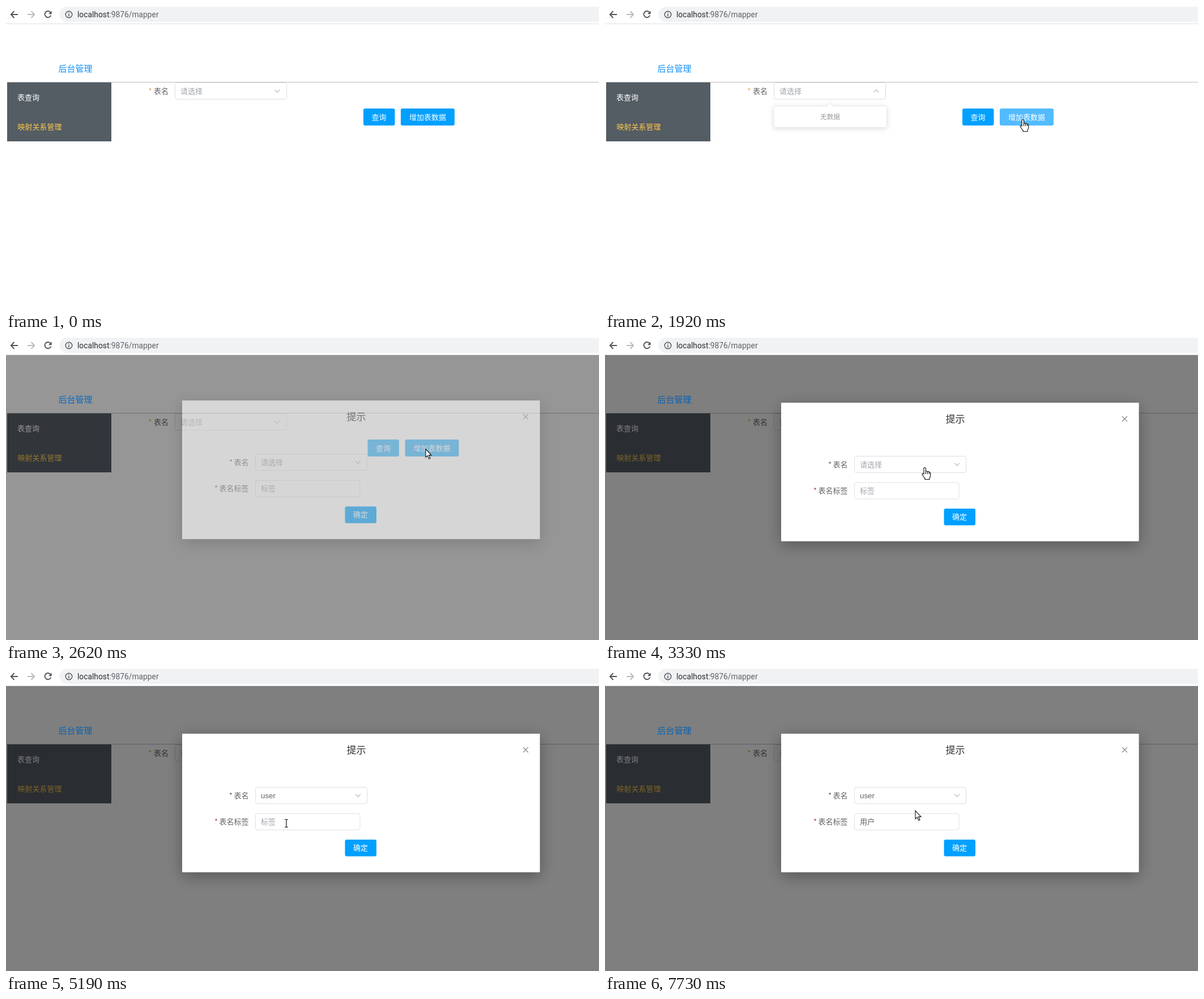
An HTML page for the animation above (7.99 s loop, 1047 by 535 pixels).

```html
<!DOCTYPE html>
<html lang="zh-CN">
<head>
<meta charset="utf-8">
<title>后台管理</title>
<style>
html, body { margin: 0; width: 100%; height: 100%; overflow: hidden; background: #fff; }
svg { display: block; width: 1047px; height: 535px; }
text { font: 13px "Noto Sans CJK SC", "Noto Sans CJK", sans-serif; fill: #606266; white-space: pre; }
.mid { text-anchor: middle; }
.hint { fill: #a0a4ab; }
.btn { fill: #00a0ff; }
.onBtn { fill: #fff; text-anchor: middle; }
.box { fill: #fff; stroke: #dcdfe6; }
.chev { fill: none; stroke: #b4b8c0; stroke-width: 1.2; }
.latin { font-family: "Open Sans", "Noto Sans", sans-serif; font-size: 13.2px; }
.arial { font-family: "Liberation Sans", Arial, sans-serif; }
.icon { fill: none; stroke: #50545a; stroke-width: 1.9; }
</style>
</head>
<body>
<svg viewBox="0 0 1047 535">
  <defs>
    <filter id="soft" x="-20%" y="-40%" width="140%" height="190%">
      <feDropShadow dx="0" dy="2" stdDeviation="5" flood-opacity=".13"/>
    </filter>
    <filter id="deep" x="-15%" y="-30%" width="130%" height="170%">
      <feDropShadow dx="0" dy="7" stdDeviation="14" flood-opacity=".32"/>
    </filter>
    <path id="chevron" d="M-4.5 -2.3L0 2.3L4.5 -2.3"/>
  </defs>
  <rect width="1047" height="535" fill="#fff"/>

  <!-- browser bar -->
  <path class="icon" d="M21 15H9M14.5 9L8.8 15L14.5 21"/>
  <path class="icon" d="M38 15H50M44.5 9L50.2 15L44.5 21" style="stroke:#b9bbbe"/>
  <path class="icon" d="M78.6 11.2A5.6 5.6 0 1 0 79.4 16.5"/>
  <path d="M80.6 8.6V14.2H75Z" fill="#50545a"/>
  <path d="M1047 1.5H107.5a13.2 13.2 0 0 0 0 26.5H1047Z" fill="#f0f2f4"/>
  <circle cx="111" cy="15" r="5.8" class="icon" style="stroke-width:1.4"/>
  <path d="M111 14V18.2M111 11.3V12.8" class="icon" style="stroke-width:1.5"/>
  <text x="126" y="19.5" style="font:13.8px Roboto,sans-serif;fill:#5f6368"><tspan fill="#2b2d31">localhost</tspan>:9876/mapper</text>
  <path d="M0 31.5H1047" stroke="#dcdee0"/>

  <!-- page -->
  <path d="M2 134.5H1047" stroke="#bcbcbc"/>
  <rect x="2" y="135" width="184" height="104" fill="#545c64"/>
  <text x="20" y="165.7" style="fill:#fff">表查询</text>
  <text x="20.5" y="217.7" style="fill:#ffc94d">映射关系管理</text>
  <text x="251.5" y="155" style="fill:#e6a23c">*</text>
  <text x="261" y="154.8">表名</text>
  <rect id="sel1" class="box" x="298.5" y="135.5" width="197" height="29" rx="3.5"/>
  <text x="308" y="154.8" class="hint">请选择</text>
  <use id="chev1" href="#chevron" class="chev"/>
  <g id="pageBtns">
    <rect id="query" class="btn" x="631" y="181" width="55.5" height="30" rx="3"/>
    <text x="658.5" y="200.9" class="onBtn">查询</text>
    <rect id="add" class="btn" x="697" y="181" width="95" height="30" rx="3"/>
    <text x="744.5" y="200.9" class="onBtn">增加表数据</text>
  </g>
  <g id="drop1">
    <path filter="url(#soft)" d="M302 176.5H391L397 171.5L403 176.5H493.500a4 4 0 0 1 4 4V210.500a4 4 0 0 1 -4 4H302a4 4 0 0 1 -4 -4V180.500a4 4 0 0 1 4 -4Z" fill="#fff" stroke="#e4e7ed"/>
    <text x="397.5" y="200" class="mid" style="font-size:11.7px;fill:#999">无数据</text>
  </g>

  <path id="shade" fill-rule="evenodd"/>
  <text id="title" x="92.500" y="115.700" style="font-size:15px;font-weight:500">后台管理</text>

  <!-- dialog -->
  <rect id="back" x="311" width="631.500" height="244.500" rx="2"/>
  <g id="dialog">
    <rect x="311" y="116" width="631.500" height="244.500" rx="2" fill="#fff" filter="url(#deep)"/>
    <text x="618.500" y="151.300" class="mid" style="font-size:17px;fill:#303133">提示</text>
    <path d="M913 140L922 149M922 140L913 149" stroke="#85888e" stroke-width="1.200"/>
    <text x="394" y="230">*</text>
    <text x="402.500" y="229.800">表名</text>
    <text x="368" y="276" style="fill:#9c4a58">*</text>
    <text x="376.500" y="275.800">表名标签</text>
    <rect id="sel2" class="box" x="440.500" y="210.500" width="197" height="29" rx="3.500"/>
    <text id="pick" x="450" y="229.800" class="hint">请选择</text>
    <text id="picked" x="450" y="229.500" class="arial" style="font-size:13.300px">user</text>
    <use id="chev2" href="#chevron" class="chev"/>
    <rect id="input" class="box" x="440.500" y="257" width="184.500" height="29" rx="3.500"/>
    <text id="label" x="450" y="275.800"></text>
    <text id="typing" x="450" y="275.500" class="arial" text-decoration="underline"></text>
    <path id="caret" stroke="#333"/>
    <rect id="ok" class="btn" x="598.500" y="303" width="55.500" height="29.500" rx="3"/>
    <text x="626" y="322.300" class="onBtn" style="font-weight:500">确定</text>
  </g>
  <g id="drop2">
    <path filter="url(#soft)" d="M444.500 251.500H533.500L539.500 246.500L545.500 251.500H635.500a4 4 0 0 1 4 4V385.500a4 4 0 0 1 -4 4H444.500a4 4 0 0 1 -4 -4V255.500a4 4 0 0 1 4 -4Z" fill="#fff" stroke="#e4e7ed"/>
    <rect id="hover" x="441" width="198" height="31.500" fill="#f2f6fa"/>
    <g id="options"></g>
  </g>
  <g id="ime">
    <rect id="imeBar" x="450.500" y="287.500" height="33" fill="#fbfbfb" stroke="#d2d2d2"/>
    <g id="words"></g>
  </g>

  <!-- pointer -->
  <g id="pointer">
    <circle id="click" r="11" fill="#f8f04c" opacity=".85"/>
    <path id="arrow" d="M0 0V14.500L3.300 11.400L5.800 17L8 16L5.600 10.600H10Z" fill="#fff" stroke="#111" stroke-width="1.100"/>
    <path id="hand" d="M-2 12V2Q-2 .5 -.3 .5T1.500 2V8Q1.500 6.800 3 6.800T4.600 8.300Q4.800 7.500 6.200 7.600T7.600 9.200Q8 8.800 9 9T9.800 11V14Q9.800 17 8 19V21.500H0V19.500Q-2 17.500 -4.500 13.500Q-5.500 11.500 -4.200 11Q-3 10.800 -2 12ZM1.500 8V12M4.600 8.300V12M7.600 9.200V12" fill="#fff" stroke="#111" stroke-width="1.150"/>
    <path id="beam" d="M-3 -6.500H-.8L0 -5.800L.8 -6.500H3M-3 7H-.8L0 6.300L.8 7H3M0 -5.800V6.300" fill="none" stroke="#111" stroke-width="1.200"/>
  </g>
</svg>
<script>
const LOOP = 7990;
const BLUE = '#00a0ff', LIGHT = '#53bbff', GREY = '#dcdfe6', HOVER = '#8fc8ee';
const OPEN = 2480;          // dialog starts to appear
const ui = {};
document.querySelectorAll('[id]').forEach(e => ui[e.id] = e);

const set = (el, attrs) => { for (const k in attrs) el.setAttribute(k, attrs[k]); };
const show = (el, on) => set(el, { visibility: on ? 'visible' : 'hidden' });
const ramp = (t, start, span) => Math.min(1, Math.max(0, (t - start) / span));
const out = (u, k) => 1 - (1 - u) ** k;
const smooth = u => u * u * (3 - 2 * u);
const within = (t, a, b) => t >= a && t < b;
const mix = (a, b, u) => `rgb(${a.map((v, i) => Math.round(v + (b[i] - v) * u))})`;

function addText(parent, x, y, str, cls) {
  const el = document.createElementNS('http://www.w3.org/2000/svg', 'text');
  set(el, { x, y, class: cls });
  el.textContent = str;
  parent.append(el);
  return el;
}
['column_info', 'product', 'table_info', 'user'].forEach((name, i) =>
  addText(ui.options, 460, 277.5 + 31.5 * i, name, 'latin'));
const words = [...Array(7)].map(() => addText(ui.words, 0, 309, '', ''));

// time, x, y
const path = [
  [70, 982, 522], [420, 660, 290], [740, 428, 155], [1250, 426, 156], [1640, 660, 199],
  [1710, 668, 199], [1920, 738, 200], [2480, 738, 200], [2550, 741, 198], [2690, 741, 198],
  [3020, 594, 243], [3090, 590, 240], [3330, 565, 230], [3480, 548, 229], [3890, 546, 233],
  [4220, 513, 366], [4380, 513, 366], [4630, 497, 276], [4840, 495, 274], [6650, 495, 274],
  [6980, 630, 310], [7180, 630, 310], [7460, 548, 252], [LOOP, 548, 252]
];
const clicks = [[930, 1010], [2270, 2350], [3480, 3560], [4270, 4350], [4680, 4750]];

function pointerAt(t) {
  const i = Math.max(1, path.findIndex(k => k[0] > t));
  const [t0, x0, y0] = path[i - 1], [t1, x1, y1] = path[i];
  const u = ramp(t, t0, t1 - t0);
  return [x0 + (x1 - x0) * u, y0 + (y1 - y0) * u];
}

// open amount of a dropdown that opens at a and closes at b
const fold = (t, a, b) => t < b ? out(ramp(t, a, 300), 4) : 1 - out(ramp(t, b, 300), 4);

function drop(el, amount, cx, top) {
  show(el, amount > .01);
  set(el, { opacity: amount, transform: `translate(${cx} ${top}) scale(1 ${amount}) translate(${-cx} ${-top})` });
}
function chevron(el, x, y, t, a, b) {
  const turn = 180 * (smooth(ramp(t, a, 250)) - smooth(ramp(t, b, 200)));
  set(el, { transform: `translate(${x} ${y}) rotate(${-turn})` });
}

const keys = [5450, 5660, 5720, 5860, 6000, 6060];
const COMMIT = 6120;

function drawInput(t) {
  const n = t < COMMIT ? keys.filter(k => t >= k).length : 0;
  const done = t >= COMMIT;
  ui.label.textContent = done ? '用户' : n ? '' : '标签';
  ui.label.setAttribute('class', done ? '' : 'hint');
  ui.typing.textContent = 'yonghu'.slice(0, n);
  const x = done ? 476.5 : n ? 450 + 6.5 + 7.2 * (n - 1) + .5 : 450.5;
  set(ui.caret, { d: `M${x} 264V279` });
  show(ui.caret, within(t, 4680, 5190) || within(t, 5450, 6650) || within(t, 7180, 7730));
  set(ui.input, { stroke: t >= 4700 ? BLUE : GREY });

  show(ui.ime, n > 0);
  if (!n) return;
  const width = n < 2 ? 501 : n < 5 ? 552 : 610;
  const list = n < 2 ? '一有要也以因用' : n < 5 ? '用永勇涌拥泳咏' : ['用户', '拥护', '用', '永', '勇', '涌', '拥'];
  set(ui.imeBar, { width });
  words.forEach((w, i) => {
    set(w, { x: 462 + i * width / 7, style: i ? '' : 'fill:#1a73c8' });
    w.textContent = `${i + 1} ${list[i]}`;
  });
}

function drawPointer(t, x, y, kind) {
  show(ui.pointer, t >= 70);
  set(ui.pointer, { transform: `translate(${x} ${y})` });
  for (const k of ['arrow', 'hand', 'beam']) set(ui[k], { display: k === kind ? 'inline' : 'none' });
  set(ui.click, { display: clicks.some(([a, b]) => within(t, a, b)) ? 'inline' : 'none' });
}

function draw(t) {
  const [x, y] = pointerAt(t);
  const over = (l, top, r, b) => x >= l && x <= r && y >= top && y <= b;
  const modal = t >= OPEN;
  const onSel1 = !modal && over(298, 135, 496, 165);
  const onQuery = !modal && over(631, 181, 687, 211);
  const onAdd = !modal && over(697, 181, 792, 211);
  const onSel2 = t > 2780 && over(440, 210, 638, 240);
  const onOk = t > 4700 && over(598, 303, 654, 332);
  const onOption = within(t, 3560, 4420) && over(440, 257, 640, 383);
  const onInput = t > 4420 && over(440, 257, 625, 286);
  const hand = onSel1 || onQuery || onAdd || onSel2 || onOk || onOption;

  // page
  set(ui.sel1, { stroke: within(t, 980, 2620) ? BLUE : onSel1 ? HOVER : GREY });
  chevron(ui.chev1, 479, 150, t, 980, 2450);
  drop(ui.drop1, fold(t, 1000, 2440), 397, 171);
  set(ui.pageBtns, { transform: `translate(${modal ? 7.5 : 0} 0)` });
  set(ui.query, { style: `fill:${onQuery ? LIGHT : BLUE}` });
  set(ui.add, { style: `fill:${onAdd ? LIGHT : BLUE}` });

  // shade and dialog
  const fade = ramp(t, OPEN, 300);
  const dim = .5 * out(ramp(t, OPEN, 200), 1.43);
  const dy = modal ? -20 * (1 - out(fade, 2.6)) : 0;
  set(ui.shade, { d: `M0 32H1047V535H0ZM311 ${116 + dy}H942.5v244.5H311Z`, opacity: dim });
  set(ui.back, { y: 116 + dy, opacity: dim * .72 });
  set(ui.title, { style: `font-size:15px;font-weight:500;fill:${mix([17, 144, 245], [10, 98, 176], dim * 2)}` });
  show(ui.back, modal);
  set(ui.dialog, { opacity: fade, transform: `translate(0 ${dy})`, display: modal ? 'inline' : 'none' });

  // dialog form
  const chosen = t >= 4350;
  set(ui.sel2, { stroke: within(t, 3520, 4720) ? BLUE : onSel2 ? HOVER : GREY });
  set(ui.pick, { display: chosen ? 'none' : 'inline' });
  set(ui.picked, { display: chosen ? 'inline' : 'none' });
  chevron(ui.chev2, 621.5, 225, t, 3520, 4350);
  drop(ui.drop2, fold(t, 3540, 4350), 539.5, 246);
  const row = t > 4350 ? 3 : Math.min(3, Math.floor((y - 257) / 31.5));
  set(ui.hover, { y: 257.5 + 31.5 * row, opacity: row >= 0 ? 1 : 0 });
  set(ui.ok, { style: `fill:${onOk ? LIGHT : BLUE}` });
  if (modal) drawInput(t);
  else { show(ui.ime, false); show(ui.caret, false); }

  drawPointer(t, x, y, hand ? 'hand' : onInput ? 'beam' : 'arrow');
}

const start = performance.now();
function frame() {
  draw((performance.now() - start) % LOOP);
  requestAnimationFrame(frame);
}
frame();
</script>
</body>
</html>
```
